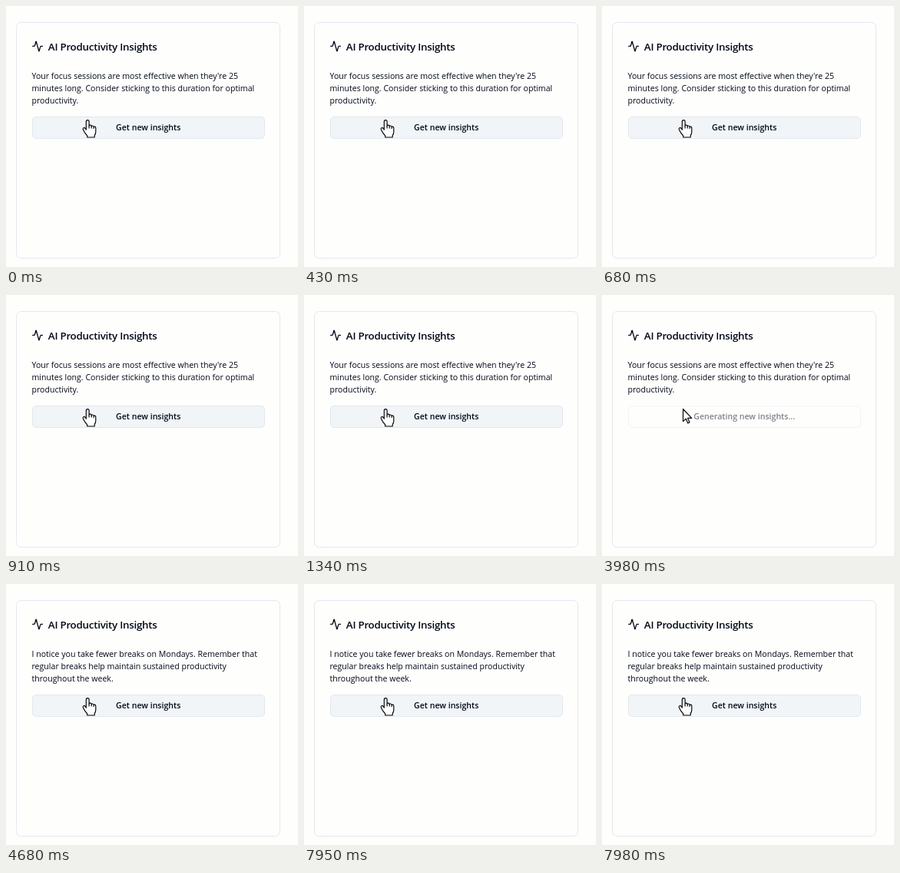
An HTML page for the animation above (8 s loop, 380x340 px).

```html
<!DOCTYPE html>
<html lang="en">
<head>
<meta charset="utf-8">
<title>Productivity insights card</title>
<style>
  :root { --page: #fefefd; --ink: #020817; --line: #e2e8f0; --hover: #f1f5f8; }
  html, body { margin: 0; width: 100%; height: 100%; overflow: hidden; background: var(--page); }
  svg { display: block; }
  text { font: 10.58px "Open Sans", "Noto Sans", sans-serif; fill: var(--ink); }
  .title { font-size: 13.4px; font-weight: 600; letter-spacing: -.02em; }
  .label { font-weight: 600; text-anchor: middle; }
  .card { fill: none; stroke: var(--line); }
  .icon { fill: none; stroke: var(--ink); stroke-width: 2; stroke-linecap: round; stroke-linejoin: round; }
  .cursor { fill: #fff; stroke: #000; stroke-width: 1.15; stroke-linejoin: round; }
  .busy .label { fill-opacity: .5; }

  .button { animation: button 8s infinite; }
  .first { animation: first 8s step-end infinite; }
  .second { animation: second 8s step-end infinite; }
  .ready { animation: ready 8s step-end infinite; }
  .busy { animation: busy 8s step-end infinite; }

  /* Click at 3960 ms, new insight at 4480 ms */
  @keyframes first { 0% { opacity: 1 } 56%, 100% { opacity: 0 } }
  @keyframes second { 0% { opacity: 0 } 56%, 100% { opacity: 1 } }
  @keyframes ready { 0% { opacity: 1 } 49.5% { opacity: 0 } 56%, 100% { opacity: 1 } }
  @keyframes busy { 0% { opacity: 0 } 49.5% { opacity: 1 } 56%, 100% { opacity: 0 } }
  @keyframes button {
    0% { fill: var(--hover); stroke: var(--line); animation-timing-function: step-end }
    49.5% { fill: var(--page); stroke: #f1f4f7; animation-timing-function: step-end }
    56% { fill: var(--page); stroke: var(--line); animation-timing-function: cubic-bezier(.4, 0, .2, 1) }
    58.2%, 100% { fill: var(--hover); stroke: var(--line) }
  }
</style>
</head>
<body>
<svg width="380" height="340" viewBox="0 0 380 340">
  <rect class="card" x="13.5" y="21.5" width="343" height="307" rx="6"/>
  <path class="icon" transform="translate(33.4 44.8) scale(.64)" d="M22 12h-2.5a2 2 0 0 0-1.9 1.5l-2.4 8.3a.25.25 0 0 1-.5 0L9.2 2.2a.25.25 0 0 0-.5 0l-2.3 8.3A2 2 0 0 1 4.5 12H2"/>
  <text class="title" x="54.8" y="58">AI Productivity Insights</text>

  <g class="first">
    <text x="33.5" y="95">Your focus sessions are most effective when they're 25</text>
    <text x="33.5" y="111">minutes long. Consider sticking to this duration for optimal</text>
    <text x="33.5" y="127">productivity.</text>
  </g>
  <g class="second">
    <text x="33.5" y="95">I notice you take fewer breaks on Mondays. Remember that</text>
    <text x="33.5" y="111">regular breaks help maintain sustained productivity</text>
    <text x="33.5" y="127">throughout the week.</text>
  </g>

  <rect class="button" x="34.5" y="144.5" width="302" height="28" rx="4.5"/>
  <g class="ready">
    <text class="label" x="185.2" y="162">Get new insights</text>
    <path class="cursor" d="M106.2 148.6q1.9 0 1.9 2v5.4q.2-1 1.5-.9 1.5.1 1.6 1.5.3-.7 1.4-.6 1.5.2 1.5 1.5.4-.5 1.3-.4 1.4.3 1.4 1.8v5.2q0 2.4-1.6 4.6v2.3h-9.5v-2q-3.2-3.3-5.4-8-.5-1.6.6-2.2 1.5-.7 2.6 1l.8 1.5v-10.6q0-2.1 1.9-2.1z"/>
    <path class="cursor" d="M108.1 156v3.5M111.2 156.6v3M114.1 157.5v2.5"/>
  </g>
  <g class="busy">
    <text class="label" x="185.2" y="162">Generating new insights...</text>
    <path class="cursor" d="M105.5 148.5v16.2l3.7-3.5 2.5 5.7 2.3-1-2.5-5.5h5.2z"/>
  </g>
</svg>
</body>
</html>
```
